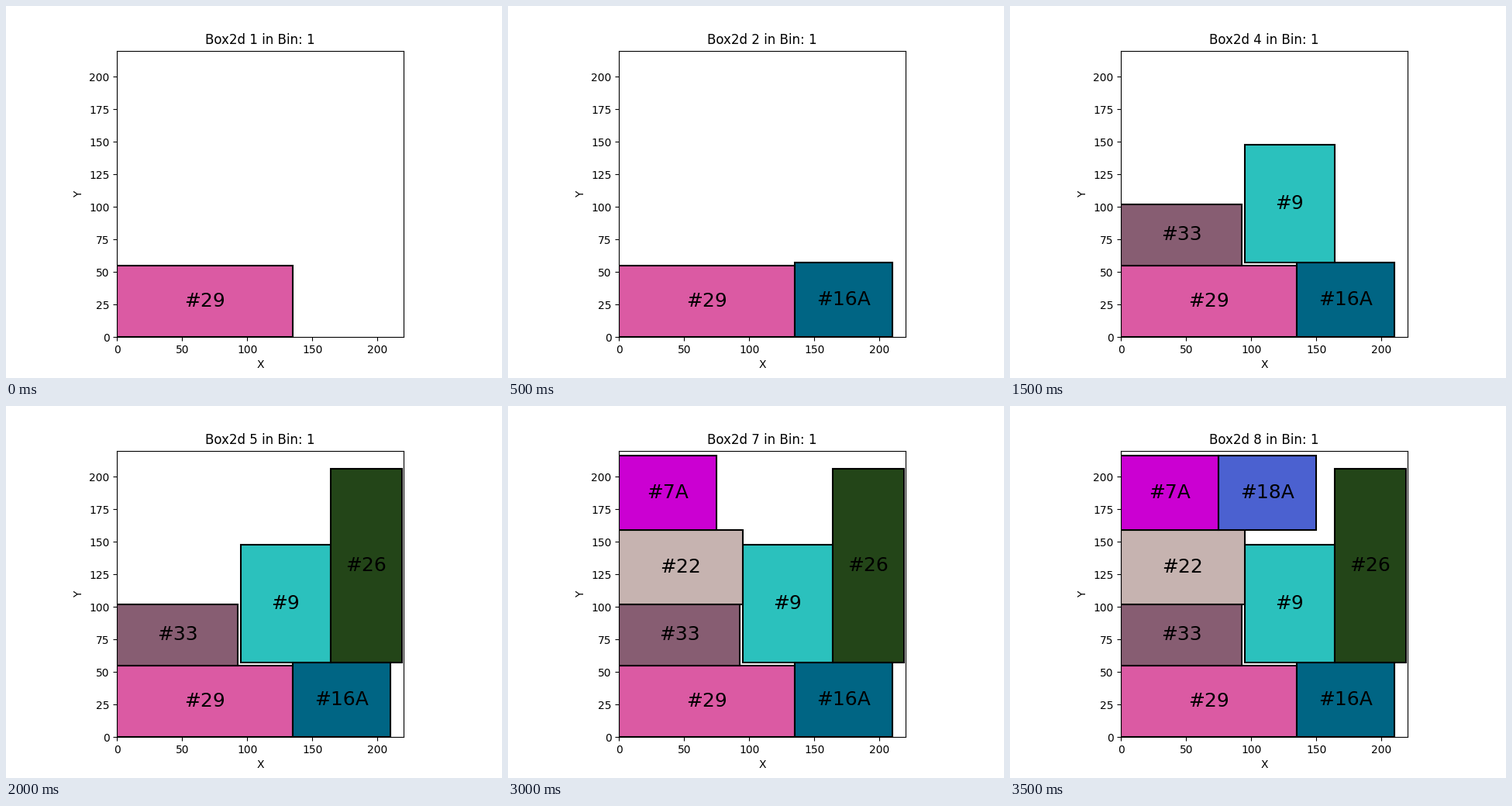
Animation, 640 px wide and 480 px high, one loop 4 s. Source, as a matplotlib script:

```python
import matplotlib.pyplot as plt
from matplotlib.animation import FuncAnimation
from matplotlib.patches import Rectangle

SIDE = 220

# label, x, y, width, height, colour, in packing order
BOXES = [
    ("#29", 0, 0, 135, 55, "#db5aa3"),
    ("#16A", 135, 0, 75, 57, "#006584"),
    ("#33", 0, 55, 93, 47, "#875d72"),
    ("#9", 95, 57, 69, 91, "#2bc1bd"),
    ("#26", 164, 57, 55, 149, "#234518"),
    ("#22", 0, 102, 95, 57, "#c6b3b0"),
    ("#7A", 0, 159, 75, 57, "#cb00d2"),
    ("#18A", 75, 159, 75, 57, "#4b61d0"),
]

plt.rcParams["font.family"] = "DejaVu Sans"
fig, ax = plt.subplots(figsize=(6.4, 4.8), dpi=100)
ax.set_aspect("equal")
ax.set(xlim=(0, SIDE), ylim=(0, SIDE), xlabel="X", ylabel="Y")
ax.set_xticks(range(0, SIDE, 50))
ax.set_yticks(range(0, SIDE, 25))
title = ax.set_title("")


def add_box(label, x, y, w, h, colour):
    rect = ax.add_patch(Rectangle((x, y), w, h, facecolor=colour,
                                  edgecolor="black", linewidth=1.5))
    text = ax.text(x + w / 2, y + h / 2, label, fontsize=18,
                   ha="center", va="center")
    return rect, text


items = [add_box(*box) for box in BOXES]


def update(step):
    for i, pair in enumerate(items):
        for artist in pair:
            artist.set_visible(i <= step)
    title.set_text(f"Box2d {step + 1} in Bin: 1")
    return [title]


anim = FuncAnimation(fig, update, frames=len(BOXES), interval=500,
                     repeat=True, repeat_delay=0)
plt.show()
```
